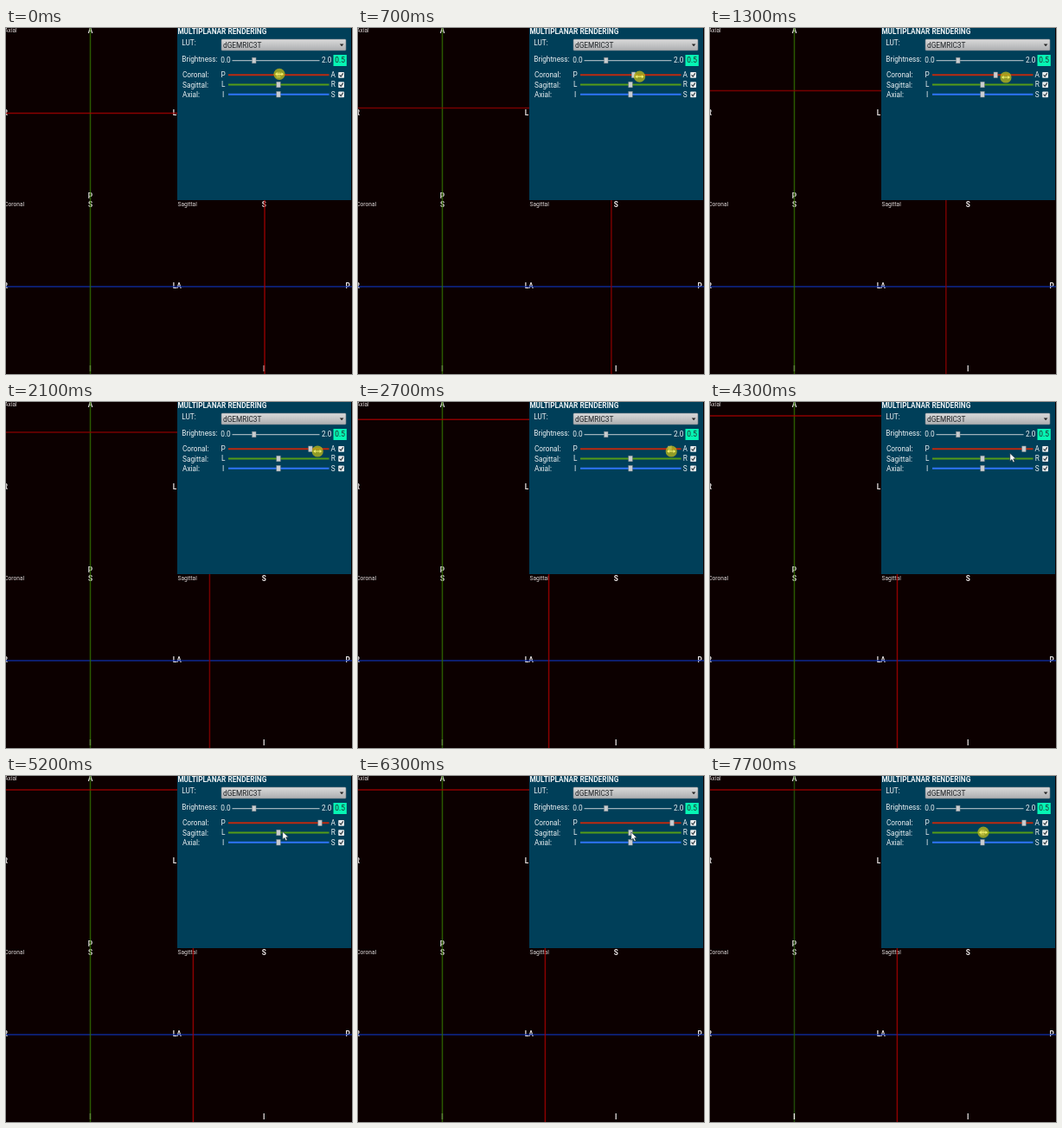
Recreate the animation shown at these times as an HTML page. Size 400x400 px, loop 8 s.

```html
<!DOCTYPE html>
<html lang="en">
<head>
<meta charset="utf-8">
<title>Multiplanar rendering</title>
<style>
  html, body { margin: 0; width: 100%; height: 100%; overflow: hidden; background: #0c0000; }
  svg { display: block; width: 100%; height: 100%; }
  text { font: 8.25px Roboto, sans-serif; fill: #eef2f4; }
  .mark { font-weight: bold; fill: #e8e4e4; }
  .view { font-size: 6.6px; fill: #dcd8d8; }
  .mid { text-anchor: middle; }
  .dark { fill: #202428; }
  .handle { fill: #c9cdd0; stroke: #84898c; stroke-width: .5; }
</style>
</head>
<body>
<svg viewBox="0 0 400 400">
  <rect width="400" height="400" fill="#0c0000"/>

  <text class="view" x="-1.7" y="5">Axial</text>
  <text class="view" x="-1.7" y="205.5">Coronal</text>
  <text class="view" x="198.5" y="205.5">Sagittal</text>

  <text class="mark mid" x="97.5" y="5.7">A</text>
  <text class="mark mid" x="97.5" y="196.6">P</text>
  <text class="mark mid" x="97.5" y="206.6">S</text>
  <text class="mark mid" x="298.3" y="206.6">S</text>
  <text class="mark mid" x="97.5" y="397">I</text>
  <text class="mark mid" x="298.3" y="397">I</text>
  <text class="mark" x="-3.2" y="101.2">R</text>
  <text class="mark" x="-3.2" y="301.4">R</text>
  <text class="mark" x="192.7" y="101.2">L</text>
  <text class="mark" x="192.7" y="301.4">LA</text>
  <text class="mark" x="392.6" y="301.4">P</text>

  <g stroke-width="1.5" stroke-opacity=".8">
    <path d="M0 299H400" stroke="#0e34b4"/>
    <path id="sagittalLine" d="M97.5 0V400"/>
    <g id="coronalLines">
      <path id="axialCut" d="M0 0H198"/>
      <path id="sagittalCut" d="M0 198V400"/>
    </g>
  </g>
  <text class="mark mid" id="inferior" x="97.5" y="397">I</text>

  <defs>
    <linearGradient id="combo" x2="0" y2="1">
      <stop stop-color="#dadada"/><stop offset="1" stop-color="#acaeb0"/>
    </linearGradient>
  </defs>
  <rect x="198" y="-1" width="201" height="200" fill="#003f59"/>
  <text x="198.4" y="6.5" style="font-weight:bold">MULTIPLANAR RENDERING</text>
  <text x="203.3" y="19.8">LUT:</text>
  <rect x="249" y="13" width="144" height="13" rx="1" fill="url(#combo)" stroke="#737f86" stroke-width=".6"/>
  <text class="dark" x="251" y="22.6">dGEMRIC3T</text>
  <path d="M385.8 18.5h4.6l-2.3 2.8z" fill="#222"/>

  <text x="203.3" y="39.3">Brightness:</text>
  <text x="248.3" y="40.4">0.0</text>
  <path d="M261.5 37.6H362.5" stroke="#9fb2bb" stroke-width="1.2"/>
  <rect class="handle" x="284.6" y="34.2" width="4.4" height="6.6"/>
  <text x="365" y="40.4">2.0</text>
  <rect x="378.5" y="31" width="15.3" height="13" fill="#06f6b4"/>
  <text class="dark mid" x="386.1" y="40.4">0.5</text>

  <g id="rows"></g>

  <g id="spot">
    <circle r="6.6" fill="#b5b41c" fill-opacity=".8"/>
    <path id="resize" d="M-5 0l2.6 -2v1.4h4.8v-1.4l2.6 2l-2.6 2v-1.4h-4.8v1.4z" fill="#f3f06a"/>
  </g>
  <path id="arrow" d="M0 0V9.2L2.2 7.2L3.8 10.6L5.4 9.8L3.9 6.6H6.8Z" fill="#fff" stroke="#10222c" stroke-width=".6"/>
</svg>
<script>
const LOOP = 8000, STEP = 100;
const RELEASE = 3900, PRESS = 6800, GRAB = 7100, RESIZE = 7700;
const rowY = i => 54.3 + i * 11.2;

const byId = id => document.getElementById(id);
const move = (id, x, y) => byId(id).setAttribute('transform', `translate(${x} ${y})`);
const show = (id, on) => byId(id).setAttribute('visibility', on ? 'visible' : 'hidden');
const paint = (id, color) => byId(id).setAttribute('stroke', color);

const progress = (t, start, length) => Math.min(1, Math.max(0, (t - start) / length));
const mix = (a, b, p) => a + (b - a) * p;
const easeInOut = p => p * p * (3 - 2 * p);
const easeOut = p => 1 - (1 - p) ** 2;

const rows = [
  { name: 'Coronal', from: 'P', to: 'A', color: '#bd2a10' },
  { name: 'Sagittal', from: 'L', to: 'R', color: '#559c18' },
  { name: 'Axial', from: 'I', to: 'S', color: '#2f74f6' }
];
byId('rows').innerHTML = rows.map(({ name, from, to, color }, i) => `
  <g transform="translate(0 ${rowY(i)})">
    <text x="204" y="3">${name}:</text>
    <text class="mid" x="251.2" y="2.8">${from}</text>
    <path d="M257 0H373.5" stroke="${color}" stroke-width="1.9"/>
    <rect class="handle" id="handle${name}" x="-2.2" y="-3.3" width="4.4" height="6.6" transform="translate(315)"/>
    <text class="mid" x="378.3" y="2.8">${to}</text>
    <rect x="384.2" y="-3.3" width="6.8" height="6.8" rx=".8" fill="#e6eaec"/>
    <path d="M385.6 0l1.6 1.9l2.5 -3.8" fill="none" stroke="#26333a" stroke-width="1.1"/>
  </g>`).join('');

// The slice trails the pointer along an S-curve and refreshes more rarely as it settles
function sliceProgress(t) {
  const shown = t < 2400 ? t : 2400 + 400 * Math.floor((t - 2300) / 400);
  return progress(shown, 0, 900) / (1 + Math.exp((1611 - shown) / 405));
}

function pointerAt(t) {
  if (t < RELEASE) {
    return [mix(316, 362.2, easeInOut(progress(t, 0, 2400))), mix(53.3, 57, progress(t, 0, 900))];
  }
  const p = easeOut(progress(t, 4000, 1700));
  return [mix(361.5, 315.8, p), mix(56.5, 65, p)];
}

function draw(t) {
  const p = sliceProgress(t), y = mix(98.6, 16, p);
  const [px, py] = pointerAt(t);
  const dragging = t < RELEASE;
  const resizing = dragging || t >= RESIZE;
  const moving = t > 0 && t < 2500;

  move('axialCut', 0, y);
  move('sagittalCut', y + 200.4, 0);
  move('handleCoronal', mix(315, 363, p), 0);
  paint('coronalLines', moving ? '#900000' : '#aa0000');
  paint('sagittalLine', t < GRAB ? '#327000' : '#265c0a');
  show('inferior', t >= GRAB);

  show('spot', dragging || t >= PRESS);
  show('resize', resizing);
  show('arrow', !resizing);
  move('spot', dragging ? px : 316, dragging ? py : 65.2);
  move('arrow', px, py);
}

function tick() {
  const t = performance.now() % LOOP;
  draw(Math.floor(t / STEP) * STEP);
  requestAnimationFrame(tick);
}
tick();
</script>
</body>
</html>
```
